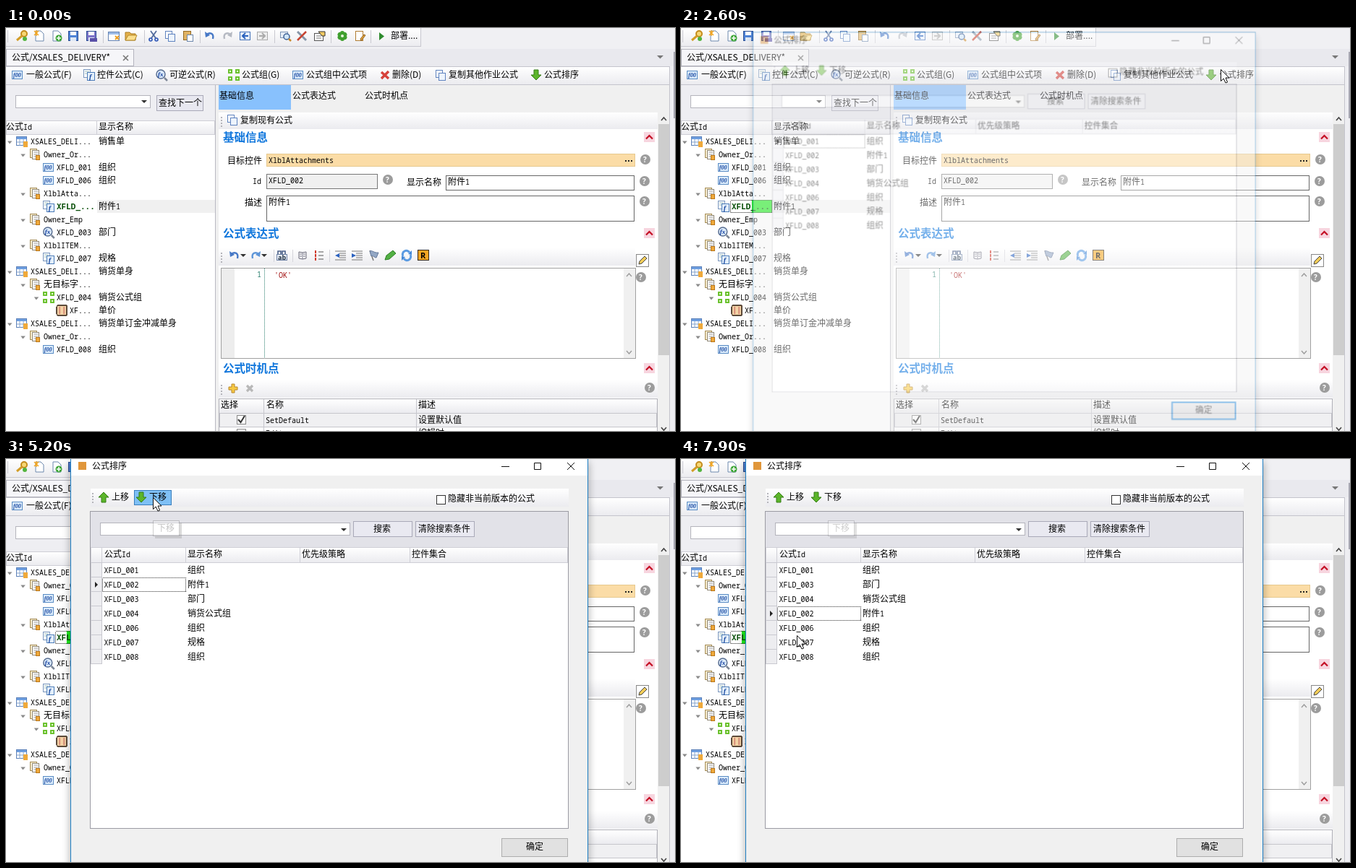
Write an HTML page that moves like this. It is 925 px wide and 558 px high and loops after 8 s.

```html
<!DOCTYPE html>
<html lang="zh">
<head>
<meta charset="utf-8">
<title>公式排序</title>
<style>
html, body { margin: 0; width: 100%; height: 100%; overflow: hidden; background: #f0f0f3; }
svg { display: block; width: 925px; height: 558px; }
text { font: 12px "Noto Sans CJK SC", "Noto Sans CJK", sans-serif; fill: #000; white-space: pre; }
.m { font: 10px "Noto Sans Mono", "DejaVu Sans Mono", monospace; }
.b { font-weight: bold; font-size: 11px; fill: #064d06; }
.h { font-size: 15.5px; font-weight: bold; fill: #0f76dc; }
.n { fill: #2b7f6f; }
.q { fill: #a31515; }
.t { fill: #575757; }
rect { shape-rendering: crispEdges; }
#dialog { transform-origin: 441px 256px; }
#shadow { filter: blur(6px); opacity: .35; }
</style>
</head>
<body>
<svg id="stage" viewBox="0 0 925 558"></svg>
<script>
const LOOP = 8000;
const box = (x, y, w, h, fill, line) => line
  ? `<rect x="${x + .5}" y="${y + .5}" width="${w - 1}" height="${h - 1}" fill="${fill}" stroke="${line}"/>`
  : `<rect x="${x}" y="${y}" width="${w}" height="${h}" fill="${fill}"/>`;
const path = (d, fill, line = 'none', w = 1) =>
  `<path d="${d}" fill="${fill}" stroke="${line}" stroke-width="${w}"/>`;
const disc = (x, y, r, fill, line = 'none', w = 1) =>
  `<circle cx="${x}" cy="${y}" r="${r}" fill="${fill}" stroke="${line}" stroke-width="${w}"/>`;
const text = (x, y, s, cls = '') => `<text x="${x}" y="${y + 4.4}" class="${cls}">${s}</text>`;
// Grid text: half-width monospaced Latin between full-width characters
const grid = (x, y, s, cls = '') =>
  text(x, y, s.replace(/[!-~]+/g, `<tspan class="m ${cls}">$&</tspan>`));
const group = (id, body) => `<g id="${id}">${body}</g>`;
const use = (id, x, y) => `<use href="#${id}" x="${x}" y="${y}"/>`;
const hover = (id, x, y, w, h) => group(id, box(x, y, w, h, '#93c9f7', '#3f86c4'));
const grip = (x, y) => [-6, -2, 2, 6].map(d => box(x, y + d, 2, 2, '#b4b4ba')).join('');

const sheet = path('M-5-7H2L6-3V7H-5z', '#fff', '#6d88ad');
const floppy = c => box(-7, -7, 14, 14, c, '#2c4f94') + box(-4, -6, 8, 5, '#fff') + box(-4, 2, 8, 5, '#dfe8f5');
const bigArrow = 'M0-7L7 0H3V7H-3V0H-7z';
const lens = box(-7, -6, 11, 9, '#e7eef8', '#7d94b5') + disc(2, 1, 4, '#cfe5fb', '#3d5f93', 1.5) + path('M5 4L8 7', 'none', '#c98b2c', 2.5);
const bend = c => path('M-5-1C-1-6 6-4 4 4', 'none', c, 2.4) + path('M-7-6L-6 2L0-1z', c);
const indent = d => path('M-7-6H8M-1-3H8M-1 0H8M-1 3H8M-7 6H8', 'none', '#777') + path(`M${-4 - 3 * d}-3L${-4 + 3 * d} 0L${-4 - 3 * d} 3z`, '#2b62c0');
const icons = {
  key: disc(3, -3, 4, '#f7d774', '#c38b1c', 2) + path('M0 0L-7 6', 'none', '#d39d27', 3) + disc(4, 4, 3, '#53b43e'),
  fresh: sheet + path('M-7-7L-1-1M-1-7L-7-1M-4-8V0', 'none', '#f2a51f', 1.5),
  addDoc: sheet + disc(3, 3, 4.5, '#3fa638') + path('M0 3H6M3 0V6', 'none', '#fff', 1.5),
  save: floppy('#4f83d6'), saveAll: floppy('#7d74c9') + box(-2, 3, 10, 5, '#5a51a8'),
  win: box(-8, -6, 16, 13, '#fff', '#6583b3') + box(-7, -5, 14, 3, '#9dbbe6') + path('M2 0L7 5M7 0L2 5', 'none', '#f0a020', 2),
  folder: path('M-8-5H-2L0-3H6V6H-8z', '#e4b04a', '#a87a20') + path('M-8 6L-4-1H8L5 6z', '#fbdf8e', '#b48a2c'),
  cut: path('M-4-7L3 3M4-7L-3 3', 'none', '#536c9c', 1.8) + disc(-4, 5, 2, 'none', '#2d55b5', 1.6) + disc(4, 5, 2, 'none', '#2d55b5', 1.6),
  copy: box(-7, -7, 10, 11, '#fff', '#5f83bf') + box(-3, -3, 10, 11, '#edf4fd', '#5f83bf'),
  paste: box(-7, -7, 11, 13, '#e0b364', '#956b24') + box(-2, -2, 9, 10, '#fff', '#6d88ad'),
  undo: bend('#4678c6'), redo: `<g transform="scale(-1 1)">${bend('#b5b9c2')}</g>`,
  redoBlue: `<g transform="scale(-1 1)">${bend('#5d95d8')}</g>`,
  back: box(-7, -6, 15, 12, '#e6effa', '#4371b8') + path('M5 0H-3M1-4L-3 0L1 4', 'none', '#2861bd', 2),
  next: box(-7, -6, 15, 12, '#eee', '#aaa') + path('M-4 0H4M0-4L4 0L0 4', 'none', '#aaa', 2),
  find: lens, reverse: disc(-1, -1, 6, '#dcebfb', '#5a6f92', 1.5) + path('M4 4L8 8', 'none', '#7d8796', 2.5) + `<text x="-5" y="2" style="font:italic bold 9px serif;fill:#123e9d">fx</text>`,
  tools: path('M-6-6L6 6', 'none', '#8796a8', 3) + path('M6-6L-6 6', 'none', '#c74432', 2.5),
  props: box(-7, -4, 13, 11, '#fff', '#555') + path('M-4 0H3M-4 3H3', 'none', '#777') + path('M-1-6H8V0H4z', '#f2ca62', '#333'),
  gear: [0, 60, 120, 180, 240, 300].map(a => `<circle r="3" cy="-4" fill="#3f9f2e" transform="rotate(${a})"/>`).join('') + disc(0, 0, 2, '#e8f5dd'),
  clip: box(-7, -7, 11, 14, '#fff', '#b07b30') + path('M7-1L1 7L0 4L5-2z', '#e4a13a', '#8b6224'),
  fx: box(-8, -6, 15, 12, '#dcecfb', '#5a8cc4') + `<text x="-6" y="3" style="font:italic bold 8px serif;fill:#1747a0">f00</text>`,
  ctl: box(-8, -8, 10, 12, '#fff', '#7996bd') + path('M-6-5H0M-6-2H0', 'none', '#9bb') + box(-3, -4, 11, 12, '#e3effb', '#4c7cb8') + `<text x="0" y="6" style="font:italic bold 10px serif;fill:#1747a0">f</text>`,
  form: box(-7, -8, 10, 13, '#f8edcf', '#a58c56') + box(-4, -6, 10, 13, '#fff', '#8f8878') + path('M-2-3H4M-2 0H4M-2 3H1', 'none', '#999') + box(1, 1, 6, 7, '#efa93a', '#b9771c'),
  table: box(-8, -7, 15, 13, '#fff', '#5d81b8') + box(-7, -6, 13, 3, '#6d9ee0') + path('M-7 1H6M-3-3V6M2-3V6', 'none', '#86a4cd') + box(2, 0, 6, 8, '#efa93a'),
  four: [[-5, -5], [5, -5], [-5, 5], [5, 5]].map(([x, y]) => box(x - 3, y - 3, 6, 6, '#6cc230') + box(x - 1, y - 1, 2, 2, '#e9f8d8')).join(''),
  price: `<rect x="-7" y="-7" width="14" height="14" rx="2" fill="#f4d3a6" stroke="#5c4a3a" stroke-width="1.5"/>` + path('M-3-5V5M3-5V5', 'none', '#d88f7b', 2),
  del: path('M-5-4L5 5M5-5L-5 5', 'none', '#d6423b', 3.4), delOff: path('M-4-4L4 4M4-4L-4 4', 'none', '#b8b8b8', 3.2),
  up: path(bigArrow, '#5cb52a', '#357d17'), down: `<g transform="scale(1 -1)">${path(bigArrow, '#5cb52a', '#357d17')}</g>`,
  help: disc(0, 0, 7, '#9c9c9c') + `<text x="-3" y="4" style="font:bold 10px 'Open Sans',sans-serif;fill:#fff">?</text>`,
  fold: box(-8, -7, 15, 14, '#f7d5df') + path('M-5 2.5L-.5-2L4 2.5', 'none', '#c40f24', 2.2),
  plus: path('M-2-6H2V-2H6V2H2V6H-2V2H-6V-2H-2z', '#f6c944', '#b8862a'),
  ab: box(-7, -2, 15, 9, '#e8eef7', '#6f83a6') + path('M-5-2V-6H-1V-2M1-2V-6H5V-2', 'none', '#4a5f88', 1.6) + `<text x="-5" y="6" style="font:bold 9px 'Open Sans',sans-serif;fill:#234">ab</text>`,
  book: path('M0-4L-5-5V4L0 5L5 4V-5z', '#fff', '#667') + path('M0-4V5M-4-2H-1M-4 1H-1M1-2H4M1 1H4', 'none', '#778'),
  list: path('M-1-5H6M-1 0H6M-1 5H6', 'none', '#555') + path('M-5-7V-3M-5-2V2M-5 3V7', 'none', '#d03a2c', 2),
  outdent: indent(-1), indent: indent(1),
  flag: path('M-5-7L0 7', 'none', '#777', 1.5) + path('M-5-6C-2-8 1-3 7-4L4 3C1 3-1-1-3 1z', '#93a7c4', '#64789b'),
  marker: path('M-7 6L-5 0L4-7L8-3L-1 5z', '#52b043', '#2f7d28'),
  sync: path('M-5 1A5 5 0 0 1 4-4M5-1A5 5 0 0 1-4 4', 'none', '#5b9be2', 3) + path('M2-2L7-7V-1zM-2 2L-7 7V1z', '#4186d6'),
  mark: box(-8, -8, 16, 15, '#f5a623', '#33281a') + `<text x="-4" y="4" style="font:bold 11px 'Open Sans',sans-serif">R</text>`,
  pencil: box(-9, -9, 18, 18, '#fff', '#888') + path('M-5 5L-4 1L3-6L6-3L-1 4z', '#f3cc58', '#444'),
  more: path('M-4-2H4L0 2z', '#333'), open: path('M-3-1.5H3.5L0 2.5z', '#8a8a8a'),
};
const row = (list, y) => list.map(([id, x]) => use(id, x, y)).join('');
const tick = x => box(x, 3, 1, 18, '#c9c9d0');

const topBar = box(0, 0, 574, 26, 'url(#bar)') + box(0, 25, 574, 1, '#c8c8d0') + box(573, 0, 1, 26, '#c8c8d0') + box(2, 3, 1, 17, '#c9c9d0') +
  row([['key', 22], ['fresh', 46], ['addDoc', 70], ['save', 93], ['saveAll', 118], ['win', 149], ['folder', 173], ['cut', 204], ['copy', 227],
    ['paste', 252], ['undo', 282], ['redo', 306], ['back', 330], ['next', 354], ['find', 386], ['tools', 409], ['props', 433], ['gear', 465], ['clip', 490]], 11) +
  [134, 191, 268, 371, 449, 504].map(tick).join('') + path('M516 6L523 11.5L516 17z', '#2e8b2e') + text(532, 11, '部署....');

const tabs = box(0, 29, 925, 24, '#e9e9ee') + box(0, 29, 177, 24, '#f6f6f9', '#b5b5be') + text(8, 41, '公式/XSALES_DELIVERY*') +
  path('M162 38L169 45M169 38L162 45', 'none', '#777', 1.6) + path('M900 38H909L904.5 42.5z', '#777');

const buttons = [['fx', 16, 28, '一般公式(F)'], ['ctl', 115, 126, '控件公式(C)'], ['reverse', 215, 226, '可逆公式(R)'], ['four', 315, 326, '公式组(G)'],
  ['fx', 404, 415, '公式组中公式项'], ['del', 524, 534, '删除(D)'], ['copy', 601, 612, '复制其他作业公式'], ['down', 733, 744, '公式排序']];
const toolBar = box(-1, 53, 919, 26, 'url(#bar)', '#c4c4cc') +
  hover('hotDel', 512, 53, 77, 25) + hover('hotCopy', 589, 53, 132, 25) + hover('hotSort', 722, 53, 83, 25) +
  buttons.map(([id, ix, tx, s]) => use(id, ix, 65) + text(tx, 65, s)).join('');

const nodes = [[0, 'table', 'XSALES_DELI...', '销售单'], [1, 'form', 'Owner_Or...'], [2, 'fx', 'XFLD_001', '组织'], [2, 'fx', 'XFLD_006', '组织'],
  [1, 'form', 'XlblAtta...'], [2, 'ctl', 'XFLD_...', '附件1'], [1, 'form', 'Owner_Emp'], [2, 'reverse', 'XFLD_003', '部门'],
  [1, 'form', 'XlblITEM...'], [2, 'ctl', 'XFLD_007', '规格'], [0, 'table', 'XSALES_DELI...', '销货单身'], [1, 'form', '无目标字...'],
  [2, 'four', 'XFLD_004', '销货公式组'], [3, 'price', 'XF...', '单价'], [0, 'table', 'XSALES_DELI...', '销货单订金冲减单身'], [1, 'form', 'Owner_Or...'], [2, 'fx', 'XFLD_008', '组织']];
const left = box(0, 79, 290, 50, '#eeeef2') + box(13, 93, 187, 18, '#fff', '#b4b4bc') + use('more', 191, 102) +
  box(208, 93, 65, 22, '#e8e8f0', '#a9a9b8') + text(211, 104, '查找下一个') +
  box(0, 128, 290, 430, '#fff') + box(0, 128, 289, 20, 'url(#bar)', '#cfcfd6') + box(125, 129, 1, 18, '#cfcfd6') + box(289, 79, 1, 479, '#b9b9c2') +
  grid(0, 137, '公式Id') + grid(128, 137, '显示名称') + box(126, 238, 163, 18, '#f0f0f0') +
  group('picked', box(98, 238, 28, 18, '#20ee20') + group('pickedMore', box(84, 238, 14, 18, '#20ee20')) +
    `<rect x="68.5" y="238.5" width="57" height="17" fill="none" stroke="#222" stroke-dasharray="1 1"/>`) +
  nodes.map(([lv, icon, id, name], i) => {
    const y = 157 + 18 * i, x = 22 + 18.4 * lv;
    const parent = lv < 2 || icon == 'four';
    return (parent ? use('open', x - 17, y + 1) : '') + use(icon, x, y) +
      grid(34 + 18 * lv, y, id, i == 5 ? 'b' : '') + (name ? grid(128, y, name) : '');
  }).join('');

const head = (y, s) => text(300, y + 1, s, 'h') + use('fold', 890, y - 1);
const strip = (y, h, w = 607) => box(294, y, w, h, 'url(#bar)') + grip(297, y + h / 2);
const right = box(290, 79, 628, 479, '#f0f0f0') + box(294, 79, 100, 34, '#88c1fd') + group('hotTab', box(494, 79, 100, 34, '#fdac62')) +
  text(295, 94, '基础信息') + text(396, 94, '公式表达式') + text(496, 94, '公式时机点') +
  box(294, 117, 607, 441, '#fff') + strip(117, 23) + use('copy', 313, 127) + text(324, 128, '复制现有公式') +
  head(152, '基础信息') + grid(306, 184, '目标控件') + box(360, 174, 510, 18, '#fbdca6', '#e6c88e') + grid(363, 183, 'XlblAttachments') +
  [856, 860, 864].map(x => box(x, 183, 2, 2, '#222')).join('') +
  grid(341, 212, 'Id') + box(360, 202, 154, 21, '#f0f0f0', '#777') + grid(363, 211, 'XFLD_002') +
  grid(554, 214, '显示名称') + box(608, 204, 261, 21, '#fff', '#666') + grid(611, 213, '附件1') +
  grid(330, 242, '描述') + box(360, 232, 509, 36, '#fff', '#666') + grid(363, 241, '附件1') +
  [[884, 182], [528, 210], [883, 212], [883, 240], [878, 345]].map(p => use('help', ...p)).join('') +
  head(285, '公式表达式') + strip(304, 25, 576) +
  row([['undo', 316], ['more', 328], ['redoBlue', 345], ['more', 357], ['ab', 381], ['book', 410], ['list', 433], ['outdent', 462], ['indent', 485],
    ['flag', 508], ['marker', 531], ['sync', 554], ['mark', 577]], 315) + [370, 396, 447].map(x => box(x, 307, 1, 17, '#d4d4da')).join('') + use('pencil', 880, 322) +
  box(297, 332, 574, 126, '#fff', '#a0a0a0') + box(298, 333, 18, 124, '#ededed') + box(854, 333, 16, 124, '#f0f0f0') +
  path('M858 344L861.5 340L865 344M858 447L861.5 451L865 447', 'none', '#999', 1.3) +
  path('M357.5 333V457', 'none', '#2b7f6f').replace('/>', ' stroke-dasharray="1 1"/>') + text(347, 341, '1', 'm n') + text(371, 342, "'OK'", 'm q') +
  head(472, '公式时机点') + strip(487, 25) + use('plus', 314, 499) + use('delOff', 337, 499) + use('help', 890, 498) +
  box(294, 513, 607, 60, '#fff', '#b0b0b8') + box(295, 514, 605, 19, 'url(#bar)') + box(295, 533, 605, 20, '#f0f0f2', '#c6c6cc') +
  box(356, 514, 1, 44, '#c6c6cc') + box(567, 514, 1, 44, '#c6c6cc') +
  grid(297, 522, '选择') + grid(360, 522, '名称') + grid(570, 522, '描述') +
  box(319, 536, 13, 13, '#fff', '#888') + path('M321 542L324.5 546L330 537', 'none', '#333', 2) + grid(359, 543, 'SetDefault') + grid(570, 543, '设置默认值') +
  box(319, 555, 13, 13, '#fff', '#888') + grid(359, 561, 'Edit') + grid(570, 561, '编辑时') +
  group('blank', box(806, 117, 95, 441, '#f0f0f0') + box(806, 165, 95, 2, '#fff') + box(806, 274, 95, 213, '#fff') +
    [[806, 277, 70, 21], [882, 277, 16, 14], [806, 303, 65, 25], [871, 312, 18, 19], [806, 332, 65, 126], [871, 337, 15, 16], [806, 464, 70, 21], [882, 464, 16, 14]]
      .map(r => box(...r, '#f0f0f0')).join('')) +
  box(902, 117, 15, 441, '#f0f0f0') + box(902, 133, 15, 320, '#cdcdcd') +
  path('M906 128L909.5 124L913 128M906 553L909.5 557L913 553', 'none', '#444', 1.6) +
  box(917, 79, 1, 479, '#c4c4cc') + box(918, 53, 7, 505, '#eeeef2') + box(923, 33, 2, 92, '#a9a9b4');

const records = [['XFLD_001', '组织'], ['XFLD_002', '附件1'], ['XFLD_003', '部门'], ['XFLD_004', '销货公式组'], ['XFLD_006', '组织'], ['XFLD_007', '规格'], ['XFLD_008', '组织']];
const dialog = group('shadow', box(89, 4, 716, 570, '#000')) + box(89, -2, 716, 570, '#f0f0f0', '#1f7fc4') + box(90, 0, 714, 23, '#fff') +
  box(100, 4, 11, 11, '#e0963a') + text(119, 10, '公式排序') +
  path('M685 10.5H696M730.5 5.5H739.5V14.5H730.5zM776 5L786 15M786 5L776 15', 'none', '#111') +
  box(117, 41, 661, 25, 'url(#bar)') + grip(119, 53) +
  group('hotDown', box(177, 43, 52, 21, '#7fc0f5', '#3a7fbd')) + group('press', box(177, 43, 52, 21, '#5a9fd9', '#2d6ba5')) +
  use('up', 135, 53) + text(146, 53, '上移') + use('down', 187, 53) + text(198, 53, '下移') +
  box(595, 50, 13, 13, '#fff', '#333') + text(611, 55, '隐藏非当前版本的公式') +
  box(116, 72, 662, 440, '#fff', '#9b9ba3') + box(117, 73, 660, 50, '#e2e2e8') +
  box(130, 88, 346, 18, '#fff', '#b4b4bc') + use('more', 467, 98) +
  box(480, 86, 82, 22, '#e9e9f1', '#a9a9b8') + text(508, 97, '搜索') + box(566, 86, 82, 22, '#e9e9f1', '#a9a9b8') + text(570, 97, '清除搜索条件') +
  box(117, 122, 660, 22, 'url(#bar)', '#cfcfd6') + [132, 248, 406, 558].map(x => box(x, 123, 1, 20, '#cfcfd6')).join('') +
  ['公式Id', '显示名称', '优先级策略', '控件集合'].map((s, i) => grid([136, 251, 409, 561][i], 132, s)).join('') +
  records.map(([id, name], i) => box(117, 143 + 20 * i, 16, 21, '#ededf0', '#c9c9d0') +
    group('rec' + i, grid(135.5, 154 + 20 * i, id) + grid(251, 154 + 20 * i, name))).join('') +
  group('focus', path('M123 150L127 154L123 158z', '#222') + `<rect x="133.5" y="144.5" width="115" height="19" fill="none" stroke="#333" stroke-dasharray="1 1"/>`) +
  box(685, 525, 92, 26, '#e1e1e1', '#adadad') + group('okFocus', box(686, 526, 90, 24, 'none', '#0078d7') + box(685, 525, 92, 26, 'none', '#0078d7')) + text(719, 537, '确定') +
  group('tip', box(206, 88, 37, 22, '#999') + box(203, 85, 37, 22, '#fff', '#767676') + text(209, 96, '下移', 't'));

const defs = `<linearGradient id="bar" x2="0" y2="1"><stop stop-color="#fff"/><stop offset="1" stop-color="#ebebef"/></linearGradient>` +
  Object.entries(icons).map(([id, body]) => group(id, body)).join('');
document.getElementById('stage').innerHTML = `<defs>${defs}</defs>` + box(0, 0, 925, 558, '#f0f0f3') +
  topBar + tabs + toolBar + left + right + group('dialog', dialog) +
  group('cursor', path('M.5.5V16.5L4.2 13L7 19L9.6 18L7 12H12z', '#fff', '#111'));

// Timeline: every stop holds, or glides to the next in 100 ms steps
let css = '';
function track(id, stops, glide) {
  const frames = stops.map(([ms, rule], i) => {
    const end = i + 1 < stops.length ? stops[i + 1][0] : LOOP;
    return `${ms / LOOP * 100}%{${rule};animation-timing-function:steps(${glide ? (end - ms) / 100 : 1})}`;
  });
  css += `@keyframes ${id}{${frames.join('')}to{${stops[stops.length - 1][1]}}}#${id}{animation:${id} ${LOOP}ms infinite}\n`;
}
const fade = (id, ...stops) => track(id, [[0, 0], ...stops].map(([ms, a]) => [ms, `opacity:${a}`]));
const show = (id, ...times) => fade(id, ...times.map((ms, i) => [ms, 1 - i % 2]));
const shift = (id, ...stops) => track(id, [[0, 0], ...stops].map(([ms, n]) => [ms, `transform:translateY(${20 * n}px)`]));

show('hotTab', 1000, 1200);
show('hotDel', 1100, 1300);
show('hotCopy', 1300, 2100);
show('hotSort', 2100, 2600);
show('picked', 2400);
show('pickedMore', 2700);
show('okFocus', 2600, 4000);
show('hotDown', 4800, 7500);
show('press', 5600, 5700, 6900, 7000);
show('blank', 5900, 6500, 7200, 7800);
fade('tip', [5200, .35], [5300, .7], [5400, 1], [7800, .6], [7900, .3]);
shift('focus', [4000, 1], [6500, 2], [7600, 3]);
shift('rec1', [6500, 1], [7600, 2]);
shift('rec2', [6500, -1]);
shift('rec3', [7600, -1]);
track('dialog', [[0, 'opacity:0;transform:scale(.9715)'], [2600, 'opacity:.43;transform:scale(.9715)'],
  [2700, 'opacity:.85;transform:scale(.993)'], [2800, 'opacity:1;transform:none']]);
track('cursor', [[0, 925, 20], [100, 903, 35], [300, 640, 120], [500, 380, 165], [600, 240, 150], [900, 450, 116], [1000, 545, 95], [1100, 566, 71],
  [1500, 640, 60], [1700, 640, 60], [2200, 746, 57], [2800, 746, 57], [3400, 220, 150], [3800, 172, 170], [4100, 172, 170], [4800, 200, 57],
  [4900, 203, 53], [7400, 203, 53], [7600, 192, 110], [7700, 176, 185], [7900, 160, 244]]
  .map(([ms, x, y]) => [ms, `transform:translate(${x}px,${y}px);opacity:${ms ? 1 : 0}`]), true);
document.head.appendChild(document.createElement('style')).textContent = css;
</script>
</body>
</html>
```
